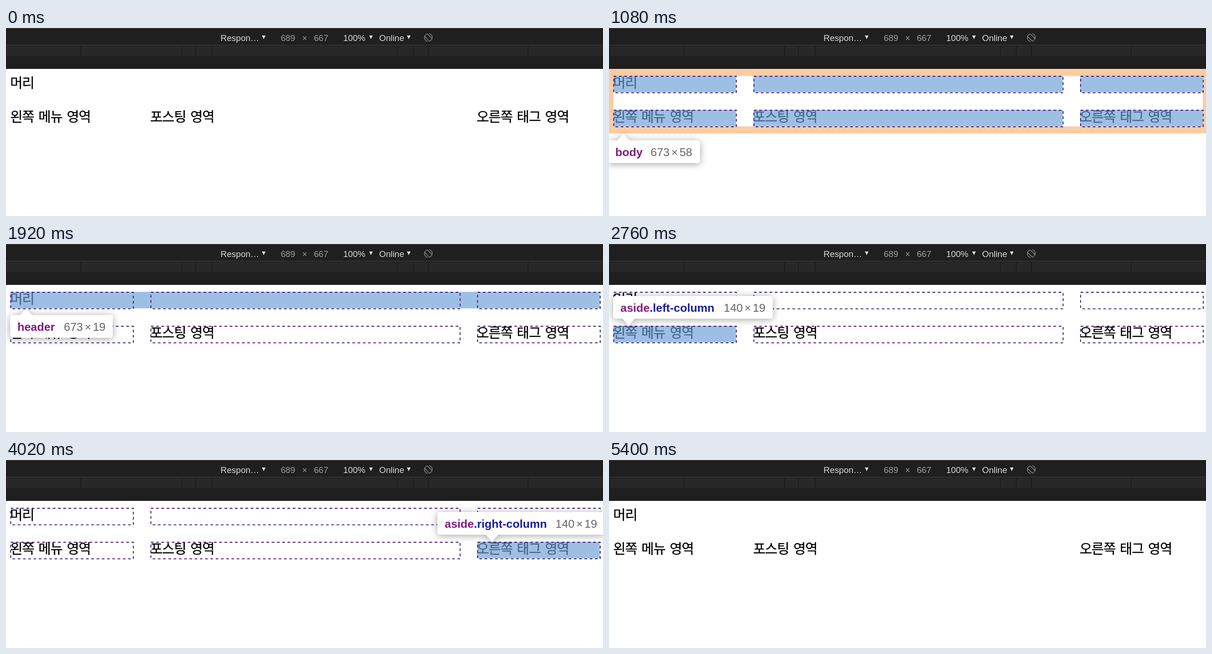
Animation of 1280x405 px, one loop 5.46 s. Source, as an HTML page:

```html
<!DOCTYPE html>
<html lang="ko">
<head>
<meta charset="utf-8">
<title>Grid inspector</title>
<style>
  html, body { margin: 0; height: 100%; overflow: hidden; background: #fff; }
  svg { display: block; width: 100%; height: 100%; }
  text { white-space: pre; }
  .bar { font: 18.6px "Liberation Sans", Arial, sans-serif; fill: #d8d8d8; }
  .dim { fill: #9c9c9c; }
  .page { font: 29px "Noto Sans CJK KR", "Noto Sans CJK", sans-serif; letter-spacing: -1.1px; word-spacing: 2.4px; stroke: #000; stroke-width: .3; }
  .fill { fill: rgba(109, 159, 215, .66); }
  .margin { fill: #fccba0; }
  .cell { fill: none; stroke: #38106e; stroke-dasharray: 3; }
  .tip { filter: drop-shadow(0 2px 8px rgba(0, 0, 0, .36)); fill: #fff; }
  .label { font: 24.5px "Liberation Sans", Arial, sans-serif; fill: #666; }
  .tag { font-weight: bold; fill: #7f1c7c; }
  .class { font-weight: bold; fill: #1a1f96; }
</style>
</head>
<body>
<svg viewBox="0 0 1280 405">
  <rect width="1280" height="88" fill="#1f1f1f"/>
  <path d="M0 .5H1280M0 37H1280" stroke="#393939" stroke-width="1.5"/>
  <rect y="39" width="1280" height="21" fill="#272727"/>
  <path d="M.5 39v21M160.5 39v21M376.5 39v21M406.5 39v21M442 39v21M839.5 39v21M873.5 39v21M905.5 39v21M1119.5 39v21" stroke="#1b1b1b" stroke-width="1.5"/>
  <path d="M0 87.5H1280" stroke="#0c0c0c"/>
  <g class="bar">
    <text x="460" y="28">Respon…</text>
    <text x="589" y="28" class="dim">689</text>
    <text x="635" y="28" class="dim">×</text>
    <text x="660" y="28" class="dim">667</text>
    <text x="723" y="28">100%</text>
    <text x="800" y="28">Online</text>
    <path d="M548.5 16h8l-4 8zM778.5 16h8l-4 8zM859.5 16h8l-4 8z"/>
  </g>
  <g transform="translate(905.5 20.5) rotate(45)" fill="none" stroke="#9a9a9a" stroke-width="1.2">
    <rect x="-8" y="-4" width="16" height="8" rx="1.5"/>
    <path d="M-5 -7A8.5 8.5 0 0 1 7.5 -4M5 7A8.5 8.5 0 0 1 -7.5 4"/>
  </g>
  <g class="page">
    <text x="9" y="129">머리</text>
    <text x="9" y="202">왼쪽 메뉴 영역</text>
    <text x="309" y="202">포스팅 영역</text>
    <text x="1009" y="202">오른쪽 태그 영역</text>
  </g>
  <g id="overlay"></g>
</svg>
<script>
const LOOP = 5460;

// Grid geometry in page pixels; inspect() scales it to the stage.
const columns = [[8, 140], [168, 353], [541, 140]];
const rows = [8, 47];
const rowHeight = 19;

const rect = (cls, x, y, w) =>
  `<rect class="${cls}" x="${x}" y="${y}" width="${w}" height="${rowHeight}"/>`;
const eachCell = draw => rows.flatMap(y => columns.map(([x, w]) => draw(x, y, w))).join('');

const highlight = (x, y, w) => rect('fill', x, y, w);
const gridLines = eachCell((x, y, w) => rect('cell', x + .5, y + .5, w));
const bodyBox = eachCell(highlight) +
  '<path class="margin" fill-rule="evenodd" d="M0 0H689V74H0zM8 8V66H681V8z"/>';

// The arrow points up or down from the box, depending on which side its tip lies.
function tooltip(x, y, right, tipX, tipY, tag, cls, sizeX, w, h) {
  const base = tipY < y ? y + 1 : y + 48;
  return `<g class="tip"><rect x="${x}" y="${y}" width="${right - x}" height="49" rx="5"/>
    <path d="M${tipX - 14} ${base}L${tipX} ${tipY}L${tipX + 14} ${base}z"/></g>
    <text class="label" x="${x + 15.5}" y="${y + 34}"><tspan class="tag">${tag}</tspan><tspan class="class">${cls}</tspan></text>
    <text class="label" x="${sizeX}" y="${y + 34}">${w}<tspan dx="3.5">×</tspan><tspan dx="3.5">${h}</tspan></text>`;
}

const inspect = (box, ...tip) =>
  `<g transform="translate(-5.8 88) scale(1.878)">${box}${gridLines}</g>` + tooltip(...tip);
const states = [
  [0, ''],
  [60, inspect(bodyBox, -2, 242, 195, 31, 228, 'body', '', 89, 673, 58)],
  [1200, inspect(highlight(8, 8, 673), 9, 153, 229, 43, 139, 'header', '', 124, 673, 19)],
  [2220, inspect(highlight(8, 47, 140), 9, 112, 351, 42, 176, 'aside', '.left-column', 246, 140, 19)],
  [3120, inspect(highlight(168, 47, 353), 309, 112, 505, 343, 176, 'main', '', 400, 353, 19)],
  [4020, inspect(highlight(541, 47, 140), 925, 112, 1283, 1042, 176, 'aside', '.right-column', 1178, 140, 19)],
  [4680, '']
];

const overlay = document.getElementById('overlay');
let shown;
function frame() {
  const t = performance.now() % LOOP;
  const state = states.findLast(([start]) => start <= t);
  if (state !== shown) overlay.innerHTML = (shown = state)[1];
  requestAnimationFrame(frame);
}
frame();
</script>
</body>
</html>
```
